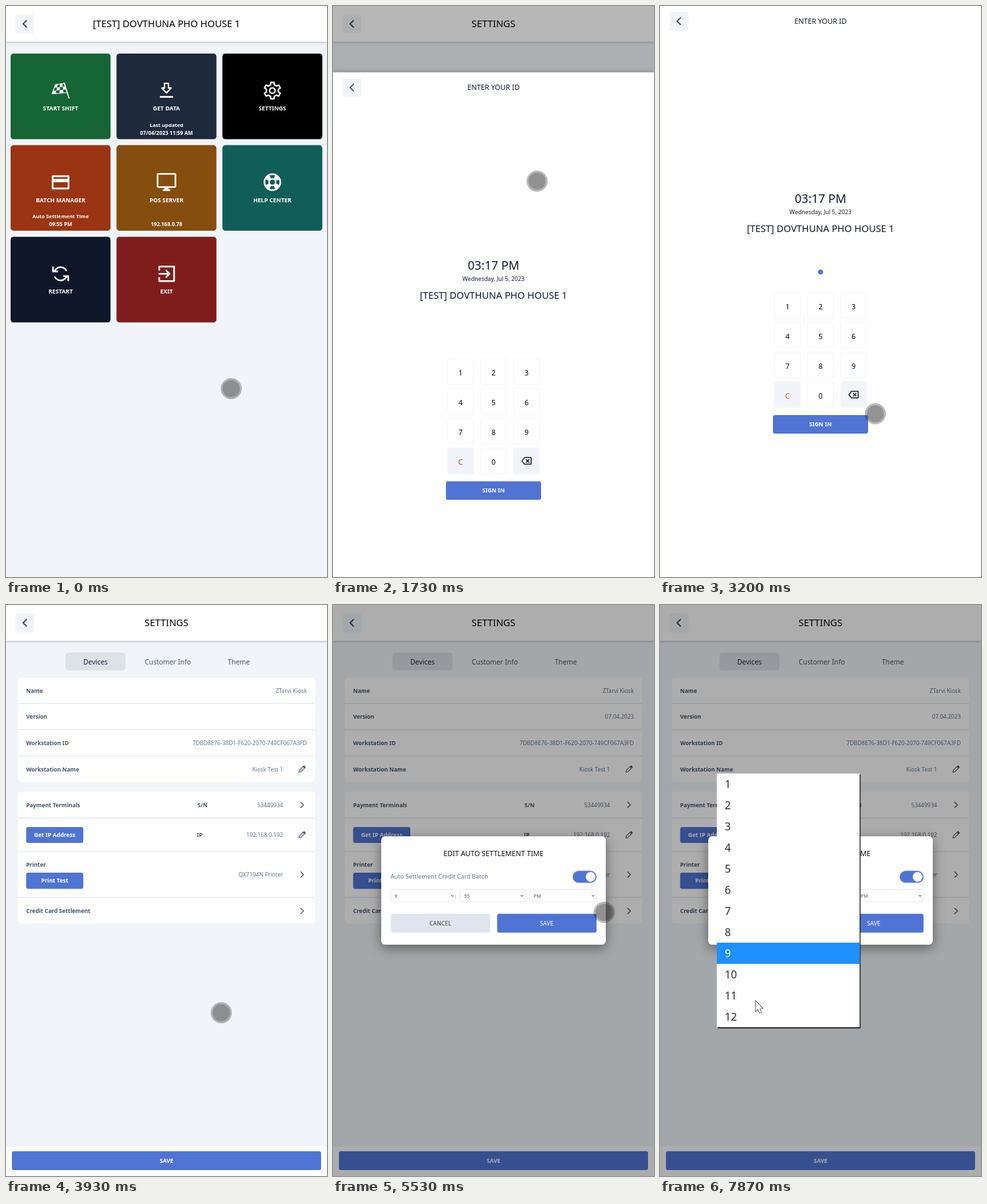
Animation of 486 by 864 pixels, one loop 8 s. Source, as an HTML page with a canvas:

```html
<!DOCTYPE html>
<html lang="en">
<head>
<meta charset="utf-8">
<title>Kiosk settings</title>
<style>
html, body { margin: 0; width: 100%; height: 100%; overflow: hidden; background: #f1f5f9; }
canvas { display: block; width: 100vw; height: 100vh; }
</style>
</head>
<body>
<canvas id="stage"></canvas>
<script>
const W = 486, H = 864, LOOP = 8000;
const FONT = '"Noto Sans", "Open Sans", sans-serif';
const BLUE = '#5074d3', PALE = '#f1f5f9', LINE = '#e2e8f0', SLATE = '#475569', GREY = '#64748b', INK = '#0f172a';
const SHOP = '[TEST] DOVTHUNA PHO HOUSE 1';

const canvas = document.getElementById('stage');
const dpr = window.devicePixelRatio || 1;
canvas.width = W * dpr;
canvas.height = H * dpr;
const c = canvas.getContext('2d');

const clamp = v => Math.max(0, Math.min(1, v));
const mix = (a, b, p) => a + (b - a) * p;
const smooth = p => p * p * (3 - 2 * p);

// cubic-bezier(.32, .72, 0, 1)
function glide(x) {
  x = clamp(x);
  let lo = 0, hi = 1;
  for (let i = 0; i < 24; i++) {
    const m = (lo + hi) / 2;
    if (0.96 * (1 - m) ** 2 * m + m ** 3 < x) lo = m; else hi = m;
  }
  return 2.16 * (1 - lo) ** 2 * lo + 3 * (1 - lo) * lo * lo + lo ** 3;
}

function text(s, x, y, size, color, align = 'center', weight = 400) {
  c.font = `${weight} ${size}px ${FONT}`;
  c.textAlign = align;
  c.fillStyle = color;
  c.fillText(s, x, y + size * 0.36);
}

function box(x, y, w, h, r, fill, stroke) {
  c.beginPath();
  c.roundRect(x, y, w, h, r);
  if (fill) { c.fillStyle = fill; c.fill(); }
  if (stroke) { c.strokeStyle = stroke; c.lineWidth = 1; c.stroke(); }
}

function line(pts, color, width, close) {
  c.beginPath();
  pts.forEach(([x, y]) => c.lineTo(x, y));
  if (close) c.closePath();
  c.strokeStyle = color;
  c.lineWidth = width;
  c.stroke();
}

function ring(x, y, r, width, color, from = 0, to = Math.PI * 2) {
  c.beginPath();
  c.arc(x, y, r, from, to);
  c.strokeStyle = color;
  c.lineWidth = width;
  c.stroke();
}

function disc(x, y, r, color) {
  c.beginPath();
  c.arc(x, y, r, 0, Math.PI * 2);
  c.fillStyle = color;
  c.fill();
}

function shadow(color, blur, dy) {
  c.shadowColor = color;
  c.shadowBlur = blur * dpr;
  c.shadowOffsetY = dy * dpr;
}

function at(x, y, draw) {
  c.save();
  c.translate(x, y);
  draw();
  c.restore();
}

function dim(alpha) {
  c.fillStyle = `rgba(0,0,0,${alpha})`;
  c.fillRect(0, 0, W, H);
}

function button(label, x, y, w, h) {
  box(x, y, w, h, 3, BLUE);
  text(label, x + w / 2, y + h / 2, 8.6, '#fff', 'center', 600);
}

function backButton(y) {
  box(14.5, y - 14, 28.5, 28.5, 4, PALE);
  line([[31.5, y - 5.5], [25.8, y], [31.5, y + 5.5]], SLATE, 2);
}

function header(title) {
  c.fillStyle = PALE;
  c.fillRect(0, 0, W, H);
  c.save();
  shadow('rgba(0,0,0,.25)', 4, 1);
  c.fillStyle = '#fff';
  c.fillRect(0, 0, W, 54);
  c.restore();
  backButton(27);
  text(title, 243, 27, 14.4, '#000');
}

// Icons, each drawn around 0,0
const icons = {
  flag() {
    const p = (u, v) => [mix(mix(-8, 6, u), mix(-13, 10, u), v), mix(mix(-9, -11, u), mix(5, 3, u), v)];
    line([[5, -12], [13, 12]], '#fff', 1.6);
    line([p(0, 0), p(1, 0), p(1, 1), p(0, 1)], '#fff', 1.2, true);
    c.fillStyle = '#fff';
    for (let i = 0; i < 4; i++) for (let j = 0; j < 3; j++) {
      if ((i + j) % 2) continue;
      c.beginPath();
      [[0, 0], [1, 0], [1, 1], [0, 1]].forEach(([a, b]) => c.lineTo(...p((i + a) / 4, (j + b) / 3)));
      c.fill();
    }
  },
  download() {
    line([[-3, -11], [3, -11], [3, -4], [7, -4], [0, 3.5], [-7, -4], [-3, -4]], '#fff', 2.2, true);
    line([[-10, 9.5], [10, 9.5]], '#fff', 2.6);
  },
  gear() {
    const pts = [];
    for (let k = 0; k < 6; k++) for (const [d, r] of [[-0.32, 9.2], [-0.2, 12.6], [0.2, 12.6], [0.32, 9.2]]) {
      const a = k * Math.PI / 3 - Math.PI / 2 + d;
      pts.push([Math.cos(a) * r, Math.sin(a) * r]);
    }
    line(pts, '#fff', 2.2, true);
    ring(0, 0, 4.2, 2.3, '#fff');
  },
  card() {
    c.lineWidth = 2.6;
    c.strokeStyle = '#fff';
    c.strokeRect(-12, -9, 24, 18.5);
    c.fillStyle = '#fff';
    c.fillRect(-12, -5, 24, 5);
  },
  monitor() {
    c.beginPath();
    c.roundRect(-13.5, -12.5, 27, 20, 1.5);
    c.lineWidth = 2.5;
    c.strokeStyle = '#fff';
    c.stroke();
    line([[-5.5, 12], [5.5, 12]], '#fff', 2.6);
    c.fillStyle = '#fff';
    c.fillRect(-3, 7, 6, 5);
  },
  buoy() {
    ring(0, 0, 12, 2.5, '#fff');
    ring(0, 0, 5, 2.4, '#fff');
    for (let k = 0; k < 4; k++) {
      const a = Math.PI / 4 + k * Math.PI / 2;
      ring(0, 0, 8.6, 5.6, '#fff', a - 0.4, a + 0.4);
    }
  },
  restart() {
    for (let k = 0; k < 2; k++) {
      ring(0, 0, 10, 2.4, '#fff', Math.PI * 1.12, Math.PI * 1.86);
      line([[-11.5, -11], [-11.5, -3.5], [-4, -3.5]], '#fff', 2.4);
      c.rotate(Math.PI);
    }
  },
  exit() {
    line([[-11, -5], [-11, -11], [11.5, -11], [11.5, 11], [-11, 11], [-11, 5]], '#fff', 2.5);
    line([[-12, 0], [4, 0]], '#fff', 2.4);
    line([[-1, -5.5], [4.5, 0], [-1, 5.5]], '#fff', 2.4);
  },
  pencil() {
    c.rotate(Math.PI / 4);
    line([[-1.6, -4], [1.6, -4], [1.6, 4], [0, 6.2], [-1.6, 4]], SLATE, 1.1, true);
    c.fillStyle = SLATE;
    c.fillRect(-2, -6.6, 4, 2.4);
  },
  next() {
    line([[-2.2, -4.5], [2.4, 0], [-2.2, 4.5]], SLATE, 1.3);
  },
  erase() {
    line([[-7, 0], [-3, -5], [7, -5], [7, 5], [-3, 5]], '#222', 1.5, true);
    line([[-0.8, -2.5], [4.2, 2.5]], '#222', 1.5);
    line([[4.2, -2.5], [-0.8, 2.5]], '#222', 1.5);
  }
};
const icon = (name, x, y) => at(x, y, icons[name]);

const tiles = [
  ['START SHIFT', '#166534', 'flag'],
  ['GET DATA', '#1e293b', 'download', 'Last updated', '07/04/2023 11:59 AM'],
  ['SETTINGS', '#000', 'gear'],
  ['BATCH MANAGER', '#9a3412', 'card', 'Auto Settlement Time', '09:55 PM'],
  ['POS SERVER', '#854d0e', 'monitor', '', '192.168.0.78'],
  ['HELP CENTER', '#115e59', 'buoy'],
  ['RESTART', '#0f172a', 'restart'],
  ['EXIT', '#7f1d1d', 'exit']
];

function home() {
  header(SHOP);
  tiles.forEach(([label, color, name, top, bottom], i) => {
    const x = 7 + (i % 3) * 160.3, y = 72 + Math.floor(i / 3) * 138.6, mid = x + 75.7;
    box(x, y, 151.3, 129.5, 4.5, color);
    icon(name, mid, y + 56);
    text(label, mid, y + 83, 8.75, '#fff', 'center', 600);
    if (top) text(top, mid, y + 108, 7.8, '#fff', 'center', 600);
    if (bottom) text(bottom, mid, y + 120, 7.9, '#fff', 'center', 600);
  });
}

function pinPad(top, typed) {
  at(0, top, () => {
    c.save();
    if (top > 0) shadow('rgba(0,0,0,.25)', 8, 0);
    c.fillStyle = '#fff';
    c.fillRect(0, 0, W, H);
    c.restore();
    backButton(23);
    text('ENTER YOUR ID', 243, 23, 10.8, INK);
    text('03:17 PM', 243, 292, 18, INK);
    text('Wednesday, Jul 5, 2023', 243, 312, 8.75, INK);
    text(SHOP, 243, 337, 14.4, INK);
    if (typed) disc(243, 402.5, 3.8, BLUE);
    [...'123456789C0<'].forEach((k, i) => {
      const x = 173.5 + (i % 3) * 50, y = 433.5 + Math.floor(i / 3) * 45;
      const soft = k === 'C' || k === '<';
      box(x, y, 39, 39, 3, soft ? PALE : '#fff', PALE);
      if (k === '<') icon('erase', x + 19.5, y + 19.5 - 5 + 5);
      else text(k, x + 19.5, y + 21.5, 10.8, soft ? '#c2410c' : '#000');
    });
    button('SIGN IN', 171, 619, 144, 28);
  });
}

const label = (s, y, x = 30.5) => text(s, x, y, 8.5, SLATE, 'left', 600);
const value = (s, y, x = 455.5) => text(s, x, y, 8.55, GREY, 'right');

function settings(version, active) {
  header('SETTINGS');
  box(90, 72, 91, 27, 5, '#dde2e9');
  text('Devices', 135.5, 86, 10.35, '#1e293b');
  text('Customer Info', 245, 86, 10.35, SLATE);
  text('Theme', 352.5, 86, 10.35, SLATE);

  box(18, 110, 450, 158, 5, '#fff');
  box(18, 282.5, 450, 199.5, 5, '#fff');
  if (active) {
    c.fillStyle = '#e2e2e2';
    c.fillRect(18, 443, 450, 40);
  }
  for (const y of [149, 188.5, 228.3, 322.5, 373.3, 442.5]) line([[18, y], [468, y]], LINE, 1.3);

  label('Name', 130);
  value('ZTarvi Kiosk', 130);
  label('Version', 169);
  if (version) value('07.04.2023', 169);
  label('Workstation ID', 209);
  value('7DBD8E76-38D1-F620-2070-749CF067A3FD', 209);
  label('Workstation Name', 249);
  value('Kiosk Test 1', 249, 419.5);
  icon('pencil', 448, 248.5);

  label('Payment Terminals', 303);
  label('S/N', 303, 290);
  value('53449934', 303, 419.5);
  icon('next', 448, 302.5);
  button('Get IP Address', 30.5, 336, 86.5, 24);
  label('IP', 348, 289);
  value('192.168.0.192', 348, 419.5);
  icon('pencil', 448, 348);
  label('Printer', 393);
  button('Print Test', 30.5, 405, 86.5, 24.5);
  value('QX7194N Printer', 408, 419.5);
  icon('next', 448, 408);
  label('Credit Card Settlement', 463);
  icon('next', 448, 463);

  c.fillStyle = '#fcfdfe';
  c.fillRect(0, 818, W, 46);
  line([[0, 818], [W, 818]], '#e8ecf2', 1);
  button('SAVE', 9, 826.5, 468, 28.5);
}

function dialog(e, on) {
  c.save();
  c.translate(243, 432 + H * (1 - e));
  const k = 1 - 0.15 * (1 - e);
  c.scale(k, k);
  c.translate(-243, -432);
  c.save();
  shadow('rgba(0,0,0,.45)', 18, 5);
  box(73, 350, 340, 164, 6, '#fff');
  c.restore();
  text('EDIT AUTO SETTLEMENT TIME', 243, 376.5, 10.75, '#111', 'center', 500);
  text('Auto Settlement Credit Card Batch', 87, 411, 9.2, GREY, 'left');

  box(363, 402.3, 36, 18, 9, '#e2e5ea');
  c.globalAlpha = on;
  box(363, 402.3, 36, 18, 9, BLUE);
  c.globalAlpha = 1;
  disc(mix(372, 390, on), 411.3, 7.4, '#fff');

  c.globalAlpha = 0.45 + 0.55 * on;
  [['9', 87.5, 98], ['55', 192.8, 98], ['PM', 298, 100.5]].forEach(([s, x, w]) => {
    box(x, 430.5, w, 18.5, 3, '#fff', LINE);
    text(s, x + 5.8, 440, 7.4, SLATE, 'left');
    line([[x + w - 6.5, 439], [x + w - 4.7, 441], [x + w - 2.9, 439]], '#333', 1);
  });
  c.globalAlpha = 1;

  box(87.5, 467.3, 150.5, 28.5, 3, '#e0e5ed');
  text('CANCEL', 162.5, 482, 8.85, '#334155');
  box(248.5, 467.3, 150.5, 28.5, 3, BLUE);
  text('SAVE', 323.5, 482, 8.95, '#fff', 'center', 500);
  c.restore();
}

function hourList() {
  c.fillStyle = '#000';
  c.fillRect(87.5, 256.5, 216, 384);
  c.fillStyle = '#fff';
  c.fillRect(86, 255, 216.3, 384);
  c.fillStyle = '#1e90ff';
  c.fillRect(86, 511, 216.3, 32);
  for (let h = 1; h <= 12; h++) text(h, 98, 239.5 + h * 32, 16.2, h === 9 ? '#fff' : '#2b2b3a', 'left');
}

// time, x, y
const touchPath = [
  [70, 341, 579], [870, 393, 397], [1230, 403, 142], [1420, 400, 145], [1730, 309, 265],
  [2070, 296, 440], [2330, 296, 440], [2480, 294, 455], [2620, 294, 455], [3130, 325, 616],
  [3200, 326, 617], [4060, 326, 617], [4650, 425, 468], [5070, 416, 475], [5400, 416, 475],
  [5870, 387, 422], [6600, 387, 422], [6700, 390, 432], [6870, 300, 457], [7130, 152, 445]
];

function follow(path, t) {
  const i = path.findIndex(k => k[0] > t);
  if (i === 0) return path[0].slice(1);
  if (i < 0) return path[path.length - 1].slice(1);
  const a = path[i - 1], b = path[i], p = smooth((t - a[0]) / (b[0] - a[0]));
  return [mix(a[1], b[1], p), mix(a[2], b[2], p)];
}

function touch(t) {
  const [x, y] = follow(touchPath, t);
  disc(x, y, 16, 'rgba(25,25,25,.3)');
  disc(x, y, 13, 'rgba(25,25,25,.24)');
}

function arrow(t) {
  const [x, y] = follow([[7400, 152, 445], [7870, 144.5, 599]], t);
  at(x, y, () => {
    const pts = [[0, 0], [0, 16], [3.8, 12.6], [6.3, 18.3], [8.8, 17.2], [6.4, 11.7], [11.3, 11.4]];
    line(pts, '#000', 1.2, true);
    c.fillStyle = '#fff';
    c.fill();
  });
}

function toggleState(t) {
  if (t < 6070) return 1;
  if (t < 6600) return 1 - clamp((t - 6010) / 190);
  return clamp((t - 6490) / 190);
}

function render(t) {
  c.setTransform(dpr, 0, 0, dpr, 0, 0);
  c.lineJoin = 'round';
  if (t < 1470) {
    home();
  } else if (t < 3670) {
    const e = glide((t - 1560) / 500);
    header('SETTINGS');
    dim(0.32 * e);
    if (t > 1560) pinPad(H * (1 - e), t >= 2600);
  } else {
    settings(t >= 4060, t >= 4700 && t < 5400);
    if (t < 3920) {
      const e = glide((t - 3600) / 320);
      dim(0.32 * (1 - e));
      pinPad(H * e, true);
    }
    if (t > 4910) {
      const e = glide((t - 4910) / 500);
      dim(0.32 * e ** 3);
      dialog(e, toggleState(t));
    }
  }
  if (t < 7270) {
    touch(t);
  } else {
    hourList();
    arrow(t);
  }
}

const start = performance.now();
function tick() {
  render((performance.now() - start) % LOOP);
  requestAnimationFrame(tick);
}
tick();
</script>
</body>
</html>
```
